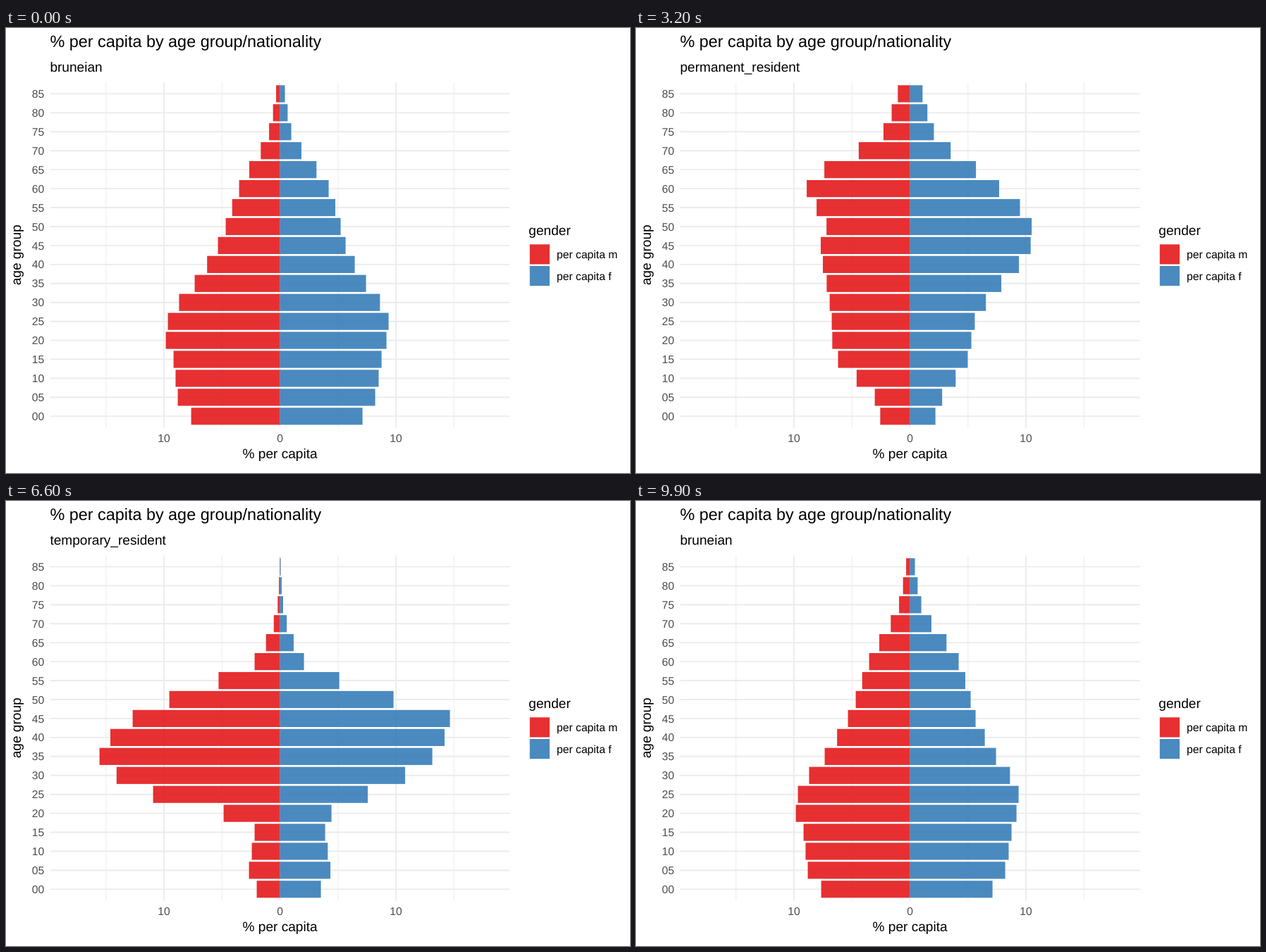
Recreate the animation shown at these times as an HTML page. Size 885 by 632 pixels, loop 10 s.

```html
<!DOCTYPE html>
<html lang="en">
<head>
<meta charset="utf-8">
<title>Population pyramid</title>
<style>
  html, body { margin: 0; width: 100%; height: 100%; overflow: hidden; background: #fff; }
  svg { display: block; width: 885px; height: 632px; }
  text { font-family: "Liberation Sans", Arial, sans-serif; text-rendering: geometricPrecision; }
</style>
</head>
<body>
<svg id="chart" viewBox="0 0 885 632"></svg>
<script>
const chart = document.getElementById('chart');
const ZERO = 388.6, UNIT = 16.45;
const LEFT = 62.4, RIGHT = 714.7, TOP = 77.4, BOTTOM = 567.6;
const ROWS = 18, FIRST_ROW = 93.4, ROW_STEP = 26.94, BAR_HEIGHT = ROW_STEP * 0.9;
const RED = '#e41a1c', BLUE = '#377eb8', GRID = '#ebebeb', GREY = '#4d4d4d';
const TEXT = 19.1, SMALL = 15.7;

// Rows where the outlines bend, counted from the oldest group; curves fill the rest.
const KNOTS = [0, 2, 5, 7, 8, 10, 12, 13, 14, 16, 17];

// Smooth curve through the key lengths that never overshoots them.
function outline(...keys) {
  const gaps = KNOTS.slice(1).map((knot, i) => knot - KNOTS[i]);
  const rise = gaps.map((gap, i) => (keys[i + 1] - keys[i]) / gap);
  const slope = keys.map((_, i) => {
    const a = rise[i - 1] ?? rise[i], b = rise[i] ?? a;
    return a * b > 0 ? 2 * a * b / (a + b) : 0;
  });
  return Array.from({ length: ROWS }, (_, row) => {
    const i = Math.max(0, KNOTS.findIndex(knot => knot >= row) - 1);
    const t = (row - KNOTS[i]) / gaps[i], ease = t * t * (3 - 2 * t);
    return keys[i] + (keys[i + 1] - keys[i]) * ease +
      gaps[i] * t * (1 - t) * (slope[i] * (1 - t) - slope[i + 1] * t);
  });
}

const states = [
  {
    name: 'bruneian',
    m: outline(5.5, 15.5, 58, 77, 88, 121, 159, 162, 151, 145, 126),
    f: outline(7, 16, 69, 86, 93, 122, 154, 151, 144, 135, 117)
  },
  {
    name: 'permanent_resident',
    m: outline(18, 39, 152, 121, 129, 118, 108, 107, 99, 44, 37),
    f: outline(18.5, 35, 130, 178, 176, 130, 88, 83, 78, 40, 31)
  },
  {
    name: 'temporary_resident',
    m: outline(0.4, 3.3, 36, 157, 209, 256, 180, 80, 36, 44, 33),
    f: outline(1, 4.4, 34, 161, 241, 216, 124.5, 73, 64, 71.5, 58)
  }
];

// Last tick of each hold and the number of ticks the move after it takes.
const moves = [{ from: 16, ticks: 17 }, { from: 49, ticks: 17 }, { from: 83, ticks: 16 }];

function add(tag, attrs) {
  const node = document.createElementNS('http://www.w3.org/2000/svg', tag);
  for (const key in attrs) node.setAttribute(key, attrs[key]);
  chart.appendChild(node);
  return node;
}

function label(content, x, y, size, attrs) {
  const node = add('text', { x, y, 'font-size': size, fill: '#000', ...attrs });
  node.textContent = content;
  return node;
}

function line(x1, y1, x2, y2, width) {
  add('line', { x1, y1, x2, y2, stroke: GRID, 'stroke-width': width });
}

const block = (x, y, width, height, fill) =>
  add('rect', { x, y, width, height, fill, 'fill-opacity': 0.9 });

const rowY = row => FIRST_ROW + row * ROW_STEP;

for (const value of [-15, -5, 5, 15]) line(ZERO + value * UNIT, TOP, ZERO + value * UNIT, BOTTOM, 0.95);
for (let row = 0; row < ROWS; row++) {
  line(LEFT, rowY(row), RIGHT, rowY(row), 1.9);
  label(String(85 - row * 5).padStart(2, '0'), 54.3, rowY(row) + 5.6, SMALL, { fill: GREY, 'text-anchor': 'end' });
}
for (const value of [-10, 0, 10]) {
  const x = ZERO + value * UNIT;
  line(x, TOP, x, BOTTOM, 1.9);
  label(Math.abs(value), x, 587.5, SMALL, { fill: GREY, 'text-anchor': 'middle' });
}

const bars = Array.from({ length: ROWS }, (_, row) => {
  const y = rowY(row) - BAR_HEIGHT / 2;
  return { m: block(ZERO, y, 0, BAR_HEIGHT, RED), f: block(ZERO, y, 0, BAR_HEIGHT, BLUE) };
});

label('% per capita by age group/nationality', LEFT, 27, 23.4);
const subtitle = label('', LEFT, 61.7, TEXT);
label('% per capita', ZERO, 611, TEXT, { 'text-anchor': 'middle' });
label('age group', 0, 0, TEXT, { 'text-anchor': 'middle', transform: 'translate(21.3 322.3) rotate(-90)' });

label('gender', 741.3, 294.3, TEXT);
[['per capita m', RED], ['per capita f', BLUE]].forEach(([name, fill], i) => {
  const y = 307.3 + i * 30.7;
  block(742.8, y, 28.2, 28.2, fill);
  label(name, 781, y + 19.9, SMALL);
});

function draw(time) {
  const tick = Math.floor((time % 10000) / 100);
  let from = states[0], to = states[0], progress = 0;
  moves.forEach((move, i) => {
    if (tick <= move.from) return;
    from = states[i];
    to = states[(i + 1) % states.length];
    progress = Math.min(1, (tick - move.from) / move.ticks);
  });
  subtitle.textContent = to.name;
  bars.forEach((bar, row) => {
    const length = key => from[key][row] + (to[key][row] - from[key][row]) * progress;
    bar.m.setAttribute('x', ZERO - length('m'));
    bar.m.setAttribute('width', length('m'));
    bar.f.setAttribute('width', length('f'));
  });
}

const start = performance.now();
function loop(now) {
  draw(Math.max(0, now - start));
  requestAnimationFrame(loop);
}
draw(0);
requestAnimationFrame(loop);
</script>
</body>
</html>
```
